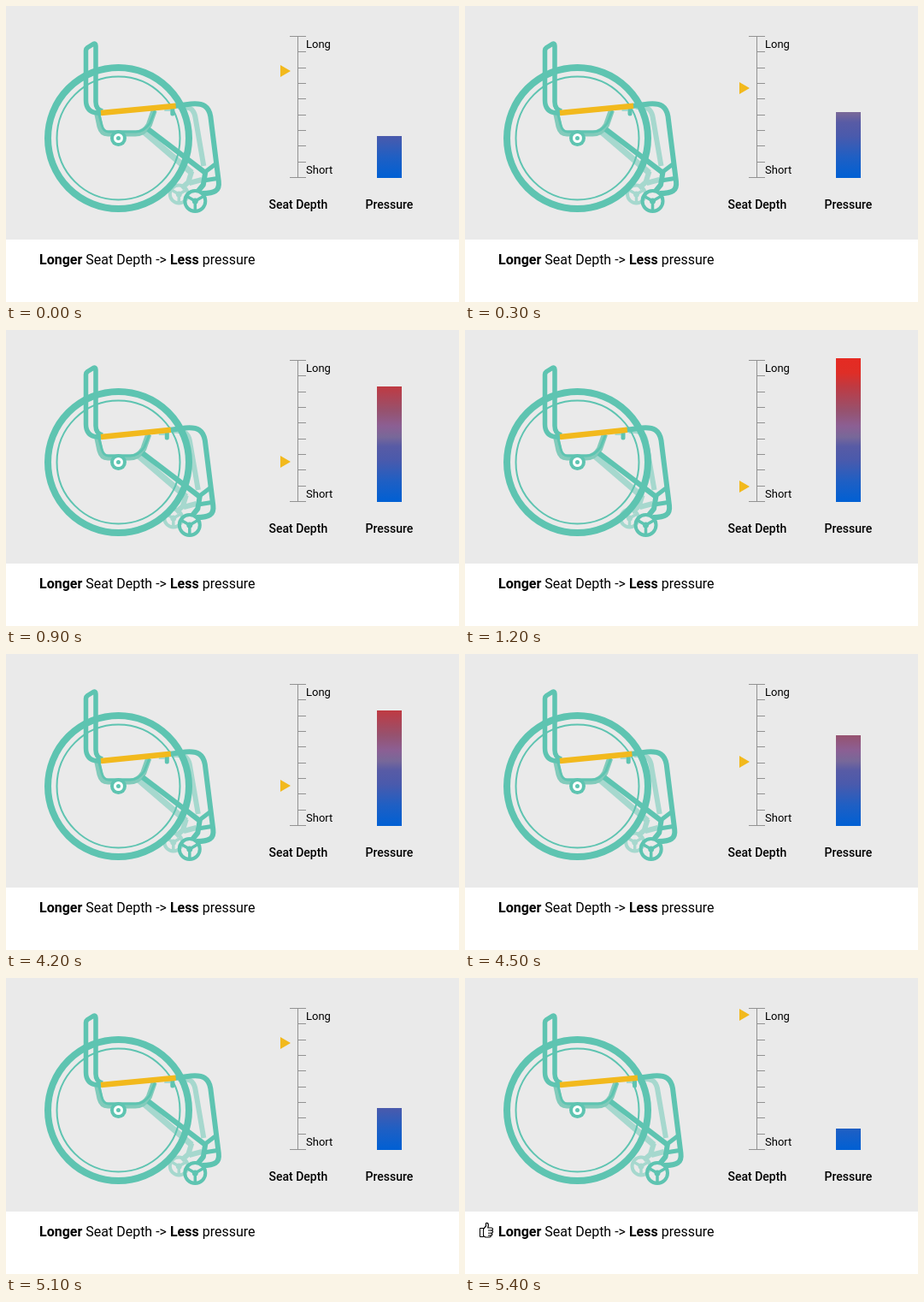
An HTML page with a canvas that plays this animation: 530 by 346 pixels, repeating every 8.4 s.

```html
<!DOCTYPE html>
<html lang="en">
<head>
<meta charset="utf-8">
<title>Seat depth and pressure</title>
<style>
  html, body { margin: 0; width: 100%; height: 100%; overflow: hidden; background: #fff; }
  canvas { display: block; }
</style>
</head>
<body>
<canvas id="stage" width="530" height="346"></canvas>
<script>
const ctx = document.getElementById('stage').getContext('2d');
const TEAL = '#5ec4b1', SOFT = '#a6d8ce', SHELL = '#82cbbb', YELLOW = '#f2b91d', GREY = '#eaeaea';
const LOOP = 8400;

// Poses from the longest seat to the shortest.
const poses = [
  { dx: 0, pointer: 43, bar: 176 },
  { dx: -3.7, pointer: 76, bar: 152 },
  { dx: -5.5, pointer: 96, bar: 124 },
  { dx: -7.3, pointer: 126, bar: 95 },
  { dx: -10.2, pointer: 154, bar: 66 },
  { dx: -13.5, pointer: 183, bar: 33 }
];

// [start in ms, pose]
const schedule = [
  [0, 1], [300, 2], [600, 3], [900, 4], [1200, 5],
  [4200, 4], [4500, 3], [4800, 2], [5100, 1], [5400, 0]
];

const heat = ctx.createLinearGradient(0, 33, 0, 201);
[[33, '#e52a22'], [50, '#df2e27'], [66, '#bf3a42'], [95, '#96526f'], [112, '#8c5f93'],
 [125, '#786899'], [136, '#585ba5'], [152, '#4a5aac'], [176, '#205fc3'], [201, '#0060d4']]
  .forEach(([y, color]) => heat.addColorStop((y - 33) / 168, color));

function stroke(path, color, width, cap = 'butt') {
  ctx.strokeStyle = color;
  ctx.lineWidth = width;
  ctx.lineCap = cap;
  ctx.lineJoin = 'round';
  ctx.stroke(new Path2D(path));
}

function ring(x, y, r, color, width) {
  ctx.beginPath();
  ctx.arc(x, y, r, 0, Math.PI * 2);
  ctx.strokeStyle = color;
  ctx.lineWidth = width;
  ctx.stroke();
}

function disc(x, y, r, color) {
  ctx.beginPath();
  ctx.arc(x, y, r, 0, Math.PI * 2);
  ctx.fillStyle = color;
  ctx.fill();
}

function text(s, x, y, size, weight = 400) {
  ctx.font = `${weight} ${size}px Roboto, sans-serif`;
  ctx.fillStyle = '#000';
  ctx.fillText(s, x, y);
  return x + ctx.measureText(s).width;
}

function caster(x, y, r, color) {
  ring(x, y, r, color, 4);
  for (let i = 0; i < 3; i++) {
    const a = Math.PI * (0.5 + i * 2 / 3);
    stroke(`M${x} ${y}L${x + r * Math.cos(a)} ${y + r * Math.sin(a)}`, color, 3.5);
  }
  disc(x, y, 3.5, color);
}

function shifted(dx, draw) {
  ctx.save();
  ctx.translate(dx, 0);
  draw();
  ctx.restore();
}

function farSide() {
  stroke('M205 118C218 117 223 120 225 129L235 187', SOFT, 6);
  stroke('M165 147L221 195', SOFT, 7);
  stroke('M221 193L217 206L209 213M218 207L233 203', SOFT, 6);
  caster(206, 220, 10.5, SOFT);
}

function nearSide() {
  stroke('M170 144L237 195', TEAL, 6);
  stroke('M201 117L220 114.5C235 113 241 118 243 129L252.5 205Q253.5 213 249 216Q245 219 233 219', TEAL, 6);
  stroke('M234 196L248.5 185M235 204L251 201.5', TEAL, 5);
  stroke('M237 194L234.5 209L228 217', TEAL, 6);
  caster(225, 228, 12, TEAL);
  stroke('M189 121L196 121', SOFT, 4);
  stroke('M198.5 119V126', TEAL, 5, 'round');
}

function chair(dx) {
  shifted(dx, farSide);
  ring(131.5, 154.5, 82.5, TEAL, 8);
  ring(131.5, 154.5, 72, TEAL, 2);

  const side = 179 + dx;
  stroke(`M106 122L110 141Q112 149 119 149H${side - 24}Q${side - 14} 149 ${side - 8} 139L${side - 2} 122`, SHELL, 7);
  stroke(`M108 123L112 139Q114 147 120 147H${side - 23}Q${side - 14} 147 ${side - 7} 137L${side - 1} 122`, TEAL, 3);
  disc(131.5, 154.5, 9.5, TEAL);
  disc(131.5, 154.5, 5.5, '#fff');
  disc(131.5, 154.5, 2.5, TEAL);

  shifted(dx, nearSide);
  stroke('M112 125H107Q93.5 124 93.5 110V52Q93.5 50 95.5 48.5L102 44.5Q105 43 105 46.5V112Q105 121 113 123', TEAL, 5.5);
  stroke(`M111 125L${202 + dx * 0.9} 116.7`, YELLOW, 6.5);
}

function scale(pointer) {
  ctx.fillStyle = '#929292';
  ctx.fillRect(341, 35, 1, 166);
  for (let i = 0; i < 10; i++) {
    const end = i % 9 === 0;
    ctx.fillRect(end ? 332 : 341, Math.round(35 + i * 18.35), end ? 19 : 10, 1);
  }
  text('Long', 351, 49, 13);
  text('Short', 351, 196, 13);
  text('Seat Depth', 307.5, 237, 14, 500);
  ctx.fillStyle = YELLOW;
  ctx.fill(new Path2D(`M321 ${pointer - 7}L333 ${pointer}L321 ${pointer + 7}Z`));
}

function pressure(top) {
  ctx.fillStyle = heat;
  ctx.fillRect(434, top, 29, 201 - top);
  text('Pressure', 420.5, 237, 14, 500);
}

function caption() {
  let x = text('Longer', 39, 301.5, 16, 700);
  x = text(' Seat Depth -> ', x, 301.5, 16);
  x = text('Less', x, 301.5, 16, 700);
  text(' pressure', x, 301.5, 16);
}

function thumb() {
  stroke('M17.5 292.5H21.5V302.5H17.5Z', '#000', 1);
  stroke('M21.5 293.5L24.5 290V287Q25 285.8 26.5 286.5Q28 288 26.8 292H31Q32.5 292.2 32.5 293.5Q32.5 295 31 295' +
         'Q32.8 295.3 32.5 297Q32.3 298.2 30.8 298.2Q32 298.8 31.8 300Q31.5 301 30 301Q30.8 303 28.5 303H24L21.5 301.5', '#000', 1.2);
  stroke('M27 295H31M27 298.2H31M27 301H30', '#000', 1);
}

function draw(t) {
  const index = schedule.filter(([start]) => start <= t).pop()[1];
  const pose = poses[index];
  ctx.fillStyle = '#fff';
  ctx.fillRect(0, 0, 530, 346);
  ctx.fillStyle = GREY;
  ctx.fillRect(0, 0, 530, 273);
  chair(pose.dx);
  scale(pose.pointer);
  pressure(pose.bar);
  caption();
  if (index === 0) thumb();
}

const began = performance.now();
function tick() {
  draw((performance.now() - began) % LOOP);
  requestAnimationFrame(tick);
}
tick();
</script>
</body>
</html>
```
